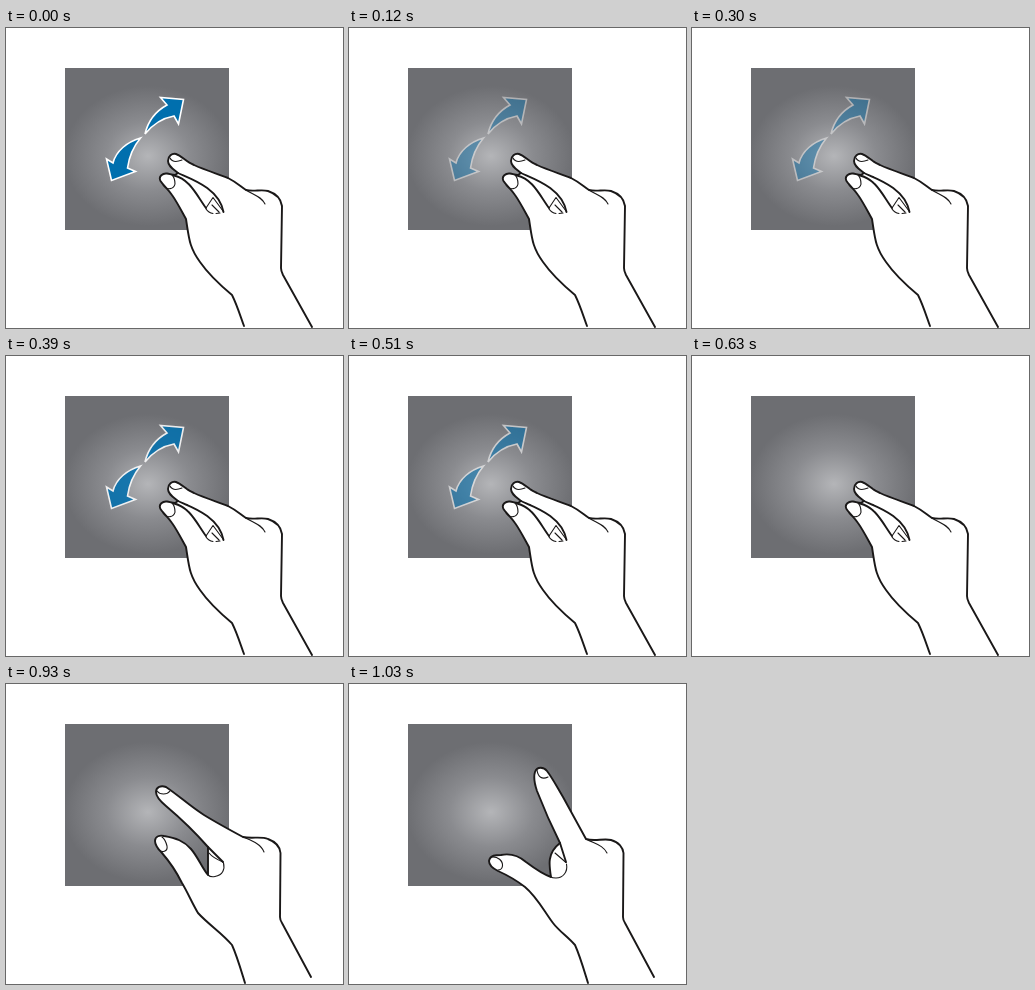
Animation, 337 px wide and 300 px high, one loop 1.93 s. Source, as an HTML page:

```html
<!DOCTYPE html>
<html>
<head>
<meta charset="utf-8">
<style>
  html, body { margin: 0; width: 100%; height: 100%; overflow: hidden; background: #fff; }
  svg { display: block; }
  .hand { fill: #fff; stroke: #1a1818; stroke-width: 1.9; stroke-linejoin: round; stroke-linecap: round; }
  .thin { fill: none; stroke-width: 1.1; }
  .line { fill: none; }
</style>
</head>
<body>
<svg width="337" height="300" viewBox="0 0 337 300">
  <defs>
    <radialGradient id="glow" gradientUnits="userSpaceOnUse" cx="0" cy="0" r="1"
      gradientTransform="translate(142 128) scale(84 70)">
      <stop offset="0" stop-color="#b4b5b8"/>
      <stop offset=".5" stop-color="#8a8b8f"/>
      <stop offset="1" stop-color="#6d6e72"/>
    </radialGradient>
  </defs>
  <rect x="59" y="40" width="164" height="162" fill="url(#glow)"/>

  <g id="arrows" fill="#006fae" stroke="#fff" stroke-width="1.6">
    <path d="M139 106C142 93 150 83 161 77L154.500 69.500L177.500 71.500L172.500 96L168 88C157 90 147 96 139 106Z"/>
    <path d="M134.500 110C121 114 110 123 107 135L100.500 131L105.500 152.500L129.500 143.500L121.500 140C123 129 127 119 134.500 110Z"/>
  </g>

  <!-- pinched -->
  <g class="hand">
    <path d="M238 298C234 287 231 277 226 267C214 257 203 247 194 234C183 219 183 210 180 191
      C175 182 171 174 166 167C162 161 157 157 154.500 153C152 148 157 145 161 145.500C164 146 166 147 169 147
      L172 145C167 141 162 138 162 133C162 128 166 125 170 126C176 128 180 134 188 137C199 142 212 146 222 150
      C230 154 234 158 240 162C248 164 255 161 262 163C271 166 275 171 276 178L275 240Q275 243 277 247L306 299"/>
    <path class="line" d="M172 145C185 151 213 160 217.500 184M168 147.500C184 151 191 168 200 180"/>
    <path class="thin" d="M200 180L207 169.500L217 183M206 177L213 184M200 181C202 184 204 185 207 185.500M210 185.500L214 185"/>
    <path class="thin" d="M164 130C166 134 171 134 176 132M157 157C161 163 168 161 169 156C169 152 168 149 166 147"/>
    <path class="thin" d="M240 162C248 167 256 169 259 176"/>
  </g>

  <!-- half open -->
  <g class="hand">
    <path d="M239 299C235 286 231 272 226 261C216 249 203 241 192 229C186 219 182 209 176 199
      C170 187 163 177 156 169C152 165 149 161 149 157C149 152 154 151 158 152C170 154 178 157 185 165
      C192 173 196 184 202 191L202 163C188 147 173 133 160 122C154 117 150 113 150 108C150 103 155 101 160 103
      C172 111 185 123 198 131C211 139 224 146 237 153C246 155 255 152 262 155C270 158 274 163 274.500 169
      L274 233Q274 236 276 239L305 293"/>
    <path class="line" d="M202 163L217 178"/>
    <path class="thin" d="M203 169C207 174 212 176 217 178M217.500 179C219 185 217 191 209 192.500C206 193 203 192 202 191"/>
    <path class="thin" d="M151 107C154 111 161 111 164 107M152 165C156 170 162 167 161 162C160 158 159 155 156 153"/>
    <path class="thin" d="M237 153C246 157 255 160 258 168"/>
  </g>

  <!-- spread -->
  <g class="hand">
    <path d="M239 299C235 286 231 272 226 261C218 252 210 247 204 239C195 227 188 213 176 203
      C167 196 158 191 149 187C143 184 140 181 140 177C141 171 147 171 152 171C162 169 170 172 177 178
      C185 184 193 190 202 193C200 181 198 169 211 159C203 143 195 125 188 107C186 101 184 94 186 88
      C188 82 195 83 198 87C204 95 208 103 214 113L237 155C246 158 254 154 262 156C270 158 274 164 274.500 169
      L274 233Q274 236 276 239L305 293"/>
    <path class="line" d="M211 159L217 178"/>
    <path class="thin" d="M206 169L217 178.500M217.500 180C219 188 214 194 207 194C205 194 203 194 202 193"/>
    <path class="thin" d="M188 86C189 93 193 96 199 93M142 173C149 172 154 177 153.500 182C153 185 151 186 149 186"/>
    <path class="thin" d="M237 155C246 160 254 161 258 169"/>
  </g>
</svg>
<script>
  const LOOP = 1930, STEP = 30, FADE = 210;
  const arrows = document.getElementById("arrows");
  const hands = document.querySelectorAll(".hand");
  const start = performance.now();

  function draw() {
    const t = (performance.now() - start) % LOOP;
    // The arrows fade out, in and out again, in small steps.
    const phase = Math.min(Math.floor(t / STEP) * STEP / FADE, 3);
    arrows.setAttribute("opacity", Math.abs(1 - phase % 2));
    if (phase === 3) arrows.setAttribute("opacity", 0);
    const pose = t < 830 ? 0 : t < 1030 ? 1 : 2;
    hands.forEach((hand, i) => hand.style.display = i === pose ? "" : "none");
    requestAnimationFrame(draw);
  }
  draw();
</script>
</body>
</html>
```
